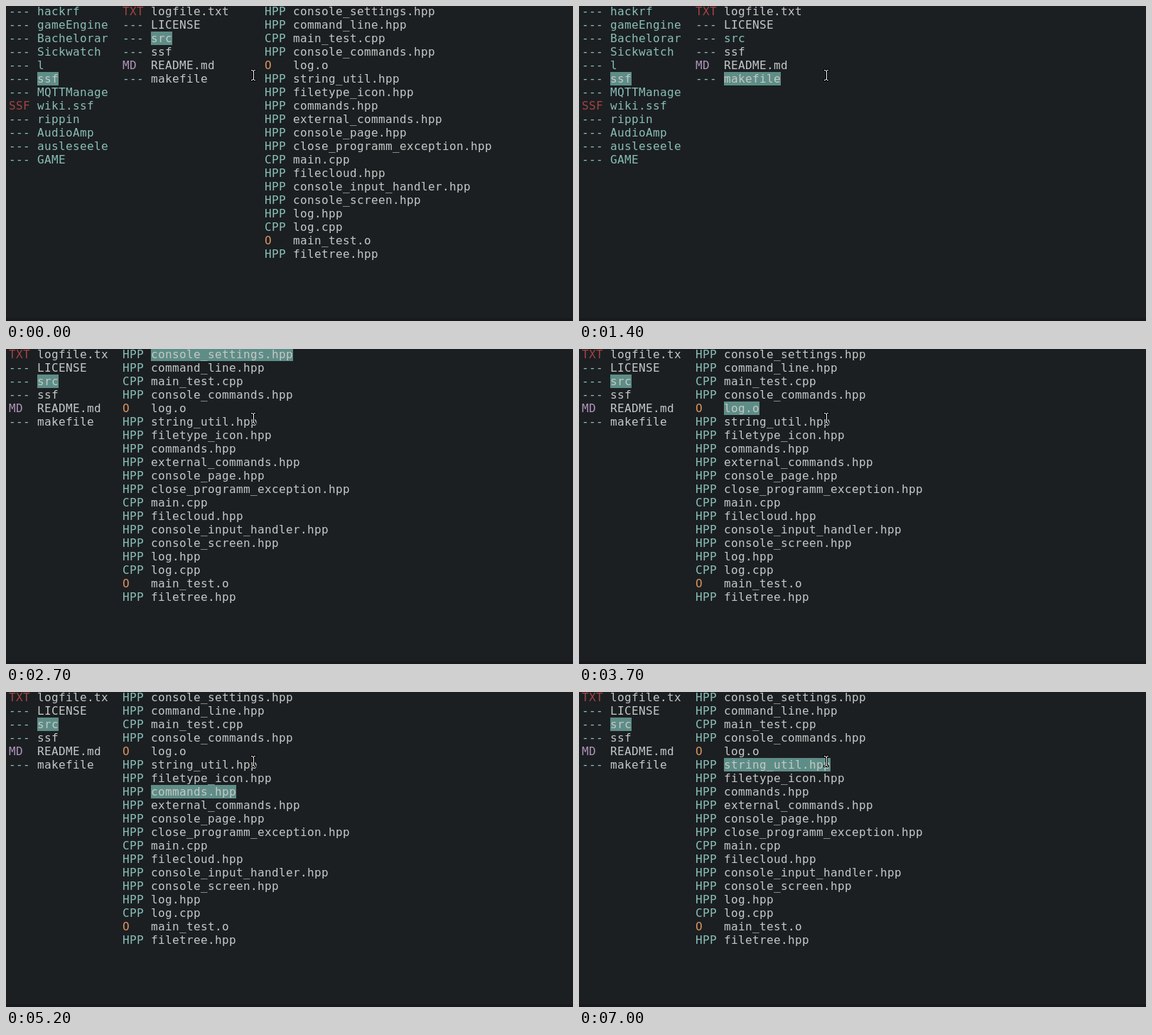
An HTML page for the animation above (8000 ms loop, 798 by 444 pixels).

```html
<!DOCTYPE html>
<html lang="en">
<head>
<meta charset="utf-8">
<style>
  html, body { margin: 0; width: 100%; height: 100%; overflow: hidden; background: #1b1f22; }
  #screen span {
    position: absolute; height: 19px; white-space: pre; color: #c5c8c6;
    font: 16px/19px "DejaVu Sans Mono", monospace; letter-spacing: calc(10px - 1ch);
  }
  #screen .cyan { color: #8abeb7; }
  #screen .red { color: #a54242; }
  #screen .orange { color: #de935f; }
  #screen .purple { color: #b294bb; }
  #screen .selected { color: #c5c8c6; background: #5e8d87; }
  #edge { position: absolute; left: 0; right: 0; top: 440px; height: 4px; background: #17191c; }
  svg { position: absolute; left: 343px; top: 89px; }
</style>
</head>
<body>
<div id="screen"></div>
<div id="edge"></div>
<svg width="11" height="17" fill="none" shape-rendering="crispEdges">
  <path d="M1 1.5H9M1 15.5H9M5 1V16" stroke="#000" stroke-width="3"/>
  <path d="M2 1.5H4M6 1.5H8M2 15.5H4M6 15.5H8M4 2.5H6M4 14.5H6M5 2V15" stroke="#fff"/>
</svg>
<script>
const parse = list => list.trim().split(/\s+/).map(entry => entry.split(":"));

const home = parse(`---:hackrf ---:gameEngine ---:Bachelorar ---:Sickwatch ---:l ---:ssf
  ---:MQTTManage SSF:wiki.ssf ---:rippin ---:AudioAmp ---:ausleseele ---:GAME`);
const project = parse(`TXT:logfile.txt ---:LICENSE ---:src ---:ssf MD:README.md ---:makefile`);
const sources = parse(`HPP:console_settings.hpp HPP:command_line.hpp CPP:main_test.cpp
  HPP:console_commands.hpp O:log.o HPP:string_util.hpp HPP:filetype_icon.hpp HPP:commands.hpp
  HPP:external_commands.hpp HPP:console_page.hpp HPP:close_programm_exception.hpp CPP:main.cpp
  HPP:filecloud.hpp HPP:console_input_handler.hpp HPP:console_screen.hpp HPP:log.hpp
  CPP:log.cpp O:main_test.o HPP:filetree.hpp`);

const LOOP = 8000, ENTER = 2700, SRC = 2;
const tagColors = { TXT: "red", SSF: "red", O: "orange", MD: "purple" };

// [time, selected row]; from ENTER on, the row is inside src
const moves = [
  [0, 2], [500, 3], [1000, 4], [1400, 5], [1600, 4], [1800, 3], [2200, 2],
  [2700, 0], [3000, 1], [3200, 2], [3300, 3], [3700, 4], [3900, 5], [4100, 6], [4400, 7],
  [4600, 8], [4800, 9], [5000, 8], [5200, 7], [5400, 6], [5500, 5], [5800, 4], [7000, 5]
];

const screen = document.getElementById("screen");

function addText(text, x, row, style) {
  const span = document.createElement("span");
  span.textContent = text;
  span.className = style;
  span.style.left = x + "px";
  span.style.top = row * 19 - 2 + "px";
  screen.append(span);
}

function addColumn(entries, x, selected, maxLength = 99) {
  entries.forEach(([tag, name], row) => {
    const isFolder = entries === home || name === "src";
    addText(tag, x, row, tagColors[tag] || "cyan");
    addText(name.slice(0, maxLength), x + 40, row,
      row === selected ? "selected" : isFolder ? "cyan" : "");
  });
}

function draw([time, row]) {
  screen.replaceChildren();
  if (time < ENTER) {
    addColumn(home, 4, 5, 10);
    addColumn(project, 164, row);
    if (row === SRC) addColumn(sources, 364, -1);
  } else {
    addColumn(project, 4, SRC, 10);
    addColumn(sources, 164, row);
  }
}

let shown;
function tick() {
  const time = performance.now() % LOOP;
  const move = moves.findLast(([start]) => start <= time);
  if (move !== shown) draw(shown = move);
  requestAnimationFrame(tick);
}
tick();
</script>
</body>
</html>
```
